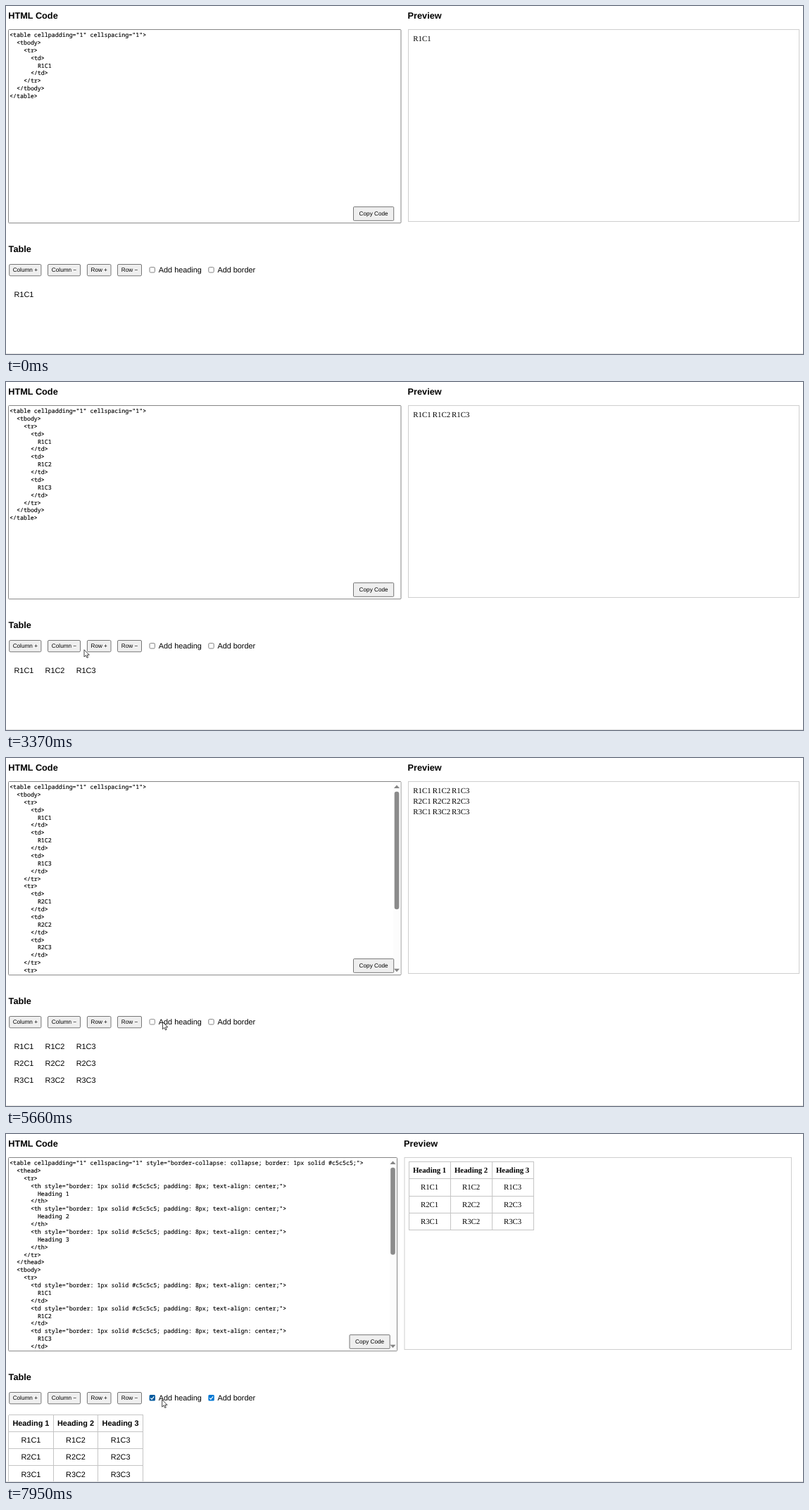
Recreate the animation shown at these times as an HTML page. Size 1132 by 495 pixels, loop 8000 ms.

```html
<!DOCTYPE html>
<html lang="en">
<head>
<meta charset="utf-8">
<title>Table builder</title>
<style>
html, body { margin: 0; width: 100%; height: 100%; overflow: hidden; background: #fff; }
svg { display: block; width: 1132px; height: 495px; }
text { font: 10.88px "Liberation Sans", Arial, sans-serif; text-rendering: geometricPrecision; }
.title { font-size: 12.73px; font-weight: bold; }
.btn { font-size: 8.2px; }
.code { font: 8.308px "Noto Sans Mono", monospace; stroke: #000; stroke-width: .15; }
.serif { font-family: "Liberation Serif", "Times New Roman", serif; }
.bold { font-weight: bold; }
.mid { text-anchor: middle; }
.grid { fill: none; stroke: #c5c5c5; shape-rendering: crispEdges; }
</style>
</head>
<body>
<svg viewBox="0 0 1132 495">
  <defs><clipPath id="area"><rect x="4" y="34" width="556" height="274"/></clipPath></defs>
  <g id="page"></g>
  <g id="cursor" fill="#fff" stroke="#222" stroke-width=".85" stroke-linejoin="round">
    <path id="arrow" d="M0 0V10.2L2.4 8 4 11.5 5.6 10.8 4.1 7.4H7.3Z"/>
    <path id="hand" d="M-1.1 8.2V1.2A1.1 1.1 0 0 1 1.1 1.2V5A1.1 1 0 0 1 3 5.3 1.1 1 0 0 1 4.7 5.8 1 1 0 0 1 6.2 6.8V9.5Q6.2 11 5.2 13H-.4Q-1 11.5-3.8 8.6A1 1 0 0 1-2.4 7.2Z"/>
  </g>
</svg>
<script>
const LOOP = 8000;
const LINE = 10.88, CHAR = 4.985;
const $ = id => document.getElementById(id);

// Table state from each time on
const states = [
  { at: 0, cols: 1, rows: 1 },
  { at: 2150, cols: 2, rows: 1 },
  { at: 2750, cols: 3, rows: 1 },
  { at: 4190, cols: 3, rows: 2 },
  { at: 4790, cols: 3, rows: 3 },
  { at: 5730, cols: 3, rows: 3, head: true },
  { at: 6760, cols: 3, rows: 3, head: true, border: true }
];

// Mouse button held for 140 ms
const presses = [2010, 2610, 4050, 4650, 5590, 6620];

// Stepped pointer moves: first step, last step, count, from, to, ease-out power
const moves = [
  [250, 1010, 12, [1032, 484], [158, 383.5], 1.5],
  [1080, 1480, 7, [118, 384.3], [34, 377], 1.7],
  [2820, 3370, 9, [36, 377], [111, 380.8], 1.3],
  [3440, 3590, 3, [117, 380.5], [124.7, 379.3], 1],
  [4910, 5120, 4, [146, 380], [223.5, 381], 1.3],
  [5320, 5390, 2, [223, 378], [222.5, 375.5], 1],
  [5800, 6350, 9, [226, 375.5], [286, 376.6], 1.4],
  [6420, 6490, 2, [282, 370], [289, 374], 1],
  [7740, 7950, 4, [279, 375], [221.7, 378], 1.3]
];

const buttons = [
  ["Column +", 4.7, 45.2],
  ["Column −", 59.5, 46],
  ["Row +", 115.4, 33.6],
  ["Row −", 158.5, 34]
];

const range = n => Array.from({ length: n }, (_, i) => i);
const esc = s => s.replace(/&/g, "&amp;").replace(/</g, "&lt;").replace(/>/g, "&gt;");
const text = (s, x, y, cls = "") => `<text x="${x}" y="${y}" class="${cls}">${esc(s)}</text>`;
const rect = (x, y, w, h, fill, stroke, rx = 0) =>
  `<rect x="${x}" y="${y}" width="${w}" height="${h}" rx="${rx}" fill="${fill}" stroke="${stroke}"/>`;
const path = (d, fill) => `<path d="${d}" fill="${fill}"/>`;

function pointer(t) {
  const move = moves.filter(m => m[0] <= t).pop();
  if (!move) return null;
  const [start, end, count, from, to, power] = move;
  const gap = (end - start) / (count - 1);
  const step = Math.min(count - 1, Math.floor((t - start) / gap + 1e-6));
  const k = 1 - Math.pow(1 - step / (count - 1), power);
  return from.map((v, i) => v + (to[i] - v) * k);
}

function hovered(p) {
  if (!p) return "";
  const [x, y] = p;
  const btn = buttons.find(b => y >= 367 && y <= 384.6 && x >= b[1] && x <= b[1] + b[2]);
  if (btn) return btn[0];
  if (y < 369 || y > 382.5) return "";
  if (x >= 203 && x < 279) return "head";
  return x >= 287 && x < 355 ? "border" : "";
}

function markup({ cols, rows, head, border }) {
  const lines = [];
  const add = (depth, s) => lines.push([depth, s]);
  const cellStyle = border ? ' style="border: 1px solid #c5c5c5; padding: 8px; text-align: center;"' : "";
  const row = (tag, label) => {
    add(2, "<tr>");
    for (const c of range(cols)) {
      add(3, `<${tag}${cellStyle}>`);
      add(4, label(c + 1));
      add(3, `</${tag}>`);
    }
    add(2, "</tr>");
  };
  const tableStyle = border ? ' style="border-collapse: collapse; border: 1px solid #c5c5c5;"' : "";
  add(0, `<table cellpadding="1" cellspacing="1"${tableStyle}>`);
  if (head) {
    add(1, "<thead>");
    row("th", c => `Heading ${c}`);
    add(1, "</thead>");
  }
  add(1, "<tbody>");
  for (const r of range(rows)) row("td", c => `R${r + 1}C${c}`);
  add(1, "</tbody>");
  add(0, "</table>");
  return lines;
}

function editor(s, right) {
  const lines = markup(s);
  let out = rect(3.5, 33.5, right - 3.5, 275.2, "#fff", "#858585", 1);
  out += `<g clip-path="url(#area)">` + lines.slice(0, 25).map(([depth, str], i) =>
    text(str, 5 + depth * 2 * CHAR, 44 + i * LINE, "code")).join("") + "</g>";
  if (lines.length > 25) {
    const x = right - 6;
    out += rect(x - 4.5, 34, 10, 274, "#fcfcfc", "none");
    out += rect(x - 3.3, 47.7, 6.6, 247 * 25.1 / lines.length, "#8b8b8b", "none", 3.3);
    out += path(`M${x - 4} 43L${x} 38.6 ${x + 4} 43Z`, "#858585");
    out += path(`M${x - 4} 299.8L${x} 304.2 ${x + 4} 299.8Z`, "#858585");
  }
  const left = right - 67.5;
  out += rect(left, 285.7, 57.2, 19.6, "#efefef", "#767676", 1);
  return out + text("Copy Code", left + 28.6, 298.2, "btn mid");
}

// Cell texts at given column and row positions
function cells({ cols, rows, head }, x, dx, y, dy, cls, headCls) {
  const shift = head ? 1 : 0;
  return range(rows + shift).map(r => range(cols).map(c => {
    const isHead = head && r === 0;
    const label = isHead ? `Heading ${c + 1}` : `R${r + 1 - shift}C${c + 1}`;
    return text(label, x + c * dx, y + r * dy, isHead ? headCls : cls);
  }).join("")).join("");
}

function grid(x, dx, y, dy, bottom) {
  const v = range(4).map(i => `M${Math.floor(x + i * dx) + .5} ${y}V${bottom}`);
  const h = range(5).map(i => Math.floor(y + i * dy) + .5).filter(q => q <= bottom + 1)
    .map(q => `M${x} ${q}H${x + 3 * dx + .5}`);
  return `<path class="grid" d="${v.join("")}${h.join("")}"/>`;
}

function preview(s, left, right) {
  const box = rect(left, 33.5, right - left, 273, "#fff", "#cfcfcf");
  if (s.border)
    return box + grid(572, 59, 39.5, 24.25, 136.5) +
      cells(s, 601.6, 59, 55.2, 24.25, "serif mid", "serif mid bold");
  return box + cells(s, left + 6.8, s.head ? 49.5 : 27.4, 50.4, 14.75, "serif", "serif bold");
}

function table(s) {
  if (s.border)
    return grid(3.5, 63.6, 399.5, 24.15, 494) +
      cells(s, 35.4, 63.6, 415.2, 24.1, "mid", "mid bold");
  return cells(s, s.head ? 37.6 : 25.4, s.head ? 68.3 : 44.1, 414.3, 23.6, "mid", "mid bold");
}

function checkbox(x, checked, hover, down) {
  if (!checked)
    return rect(x, 371.6, 7.4, 7.4, "#fff", down ? "#8d8d8d" : hover ? "#4f4f4f" : "#808080", 1.5);
  const fill = down ? "#3c95dc" : hover ? "#005a9e" : "#0078d4";
  return rect(x - .4, 371.1, 8.4, 8.4, fill, "none", 1.5) +
    `<path d="M${x + 1.3} 375.5l1.8 1.8 3.2-3.9" fill="none" stroke="#fff" stroke-width="1.2"/>`;
}

function controls(s, hover, down) {
  let out = buttons.map(([label, x, w]) => {
    const over = label === hover;
    const fill = over ? (down ? "#f5f5f5" : "#e5e5e5") : "#efefef";
    const line = over ? (down ? "#8d8d8d" : "#4f4f4f") : "#767676";
    return rect(x, 367.5, w, 16.3, fill, line, 1.5) + text(label, x + w / 2, 378.3, "btn mid");
  }).join("");
  out += checkbox(204, s.head, hover === "head", down && hover === "head");
  out += checkbox(287.8, s.border, hover === "border", down && hover === "border");
  return out + text("Add heading", 216.8, 379.4) + text("Add border", 300.4, 379.4);
}

function page(s, hover, down) {
  const left = s.head ? 566 : 571.5;
  return text("HTML Code", 3.3, 17.7, "title") +
    text("Preview", left - .9, 17.7, "title") +
    text("Table", 3.6, 350.3, "title") +
    editor(s, s.head ? 555.5 : 561) +
    preview(s, left, s.head ? 1115.5 : 1126.5) +
    controls(s, hover, down) + table(s) +
    rect(0, 494, 1132, 1, "#e3e3e3", "none");
}

let shown = "";
function draw(t) {
  const s = states.filter(q => q.at <= t).pop();
  const p = pointer(t);
  const hover = hovered(p);
  const down = presses.some(q => t >= q && t < q + 140);
  const key = [s.at, hover, down].join();
  if (key !== shown) {
    $("page").innerHTML = page(s, hover, down);
    shown = key;
  }
  $("cursor").style.display = p ? "" : "none";
  if (!p) return;
  const hand = buttons.some(b => b[0] === hover);
  $("cursor").setAttribute("transform", `translate(${p[0]} ${p[1]})`);
  $("hand").style.display = hand ? "" : "none";
  $("arrow").style.display = hand ? "none" : "";
}

const begin = performance.now();
function tick() {
  draw((performance.now() - begin) % LOOP);
  requestAnimationFrame(tick);
}
tick();
</script>
</body>
</html>
```
